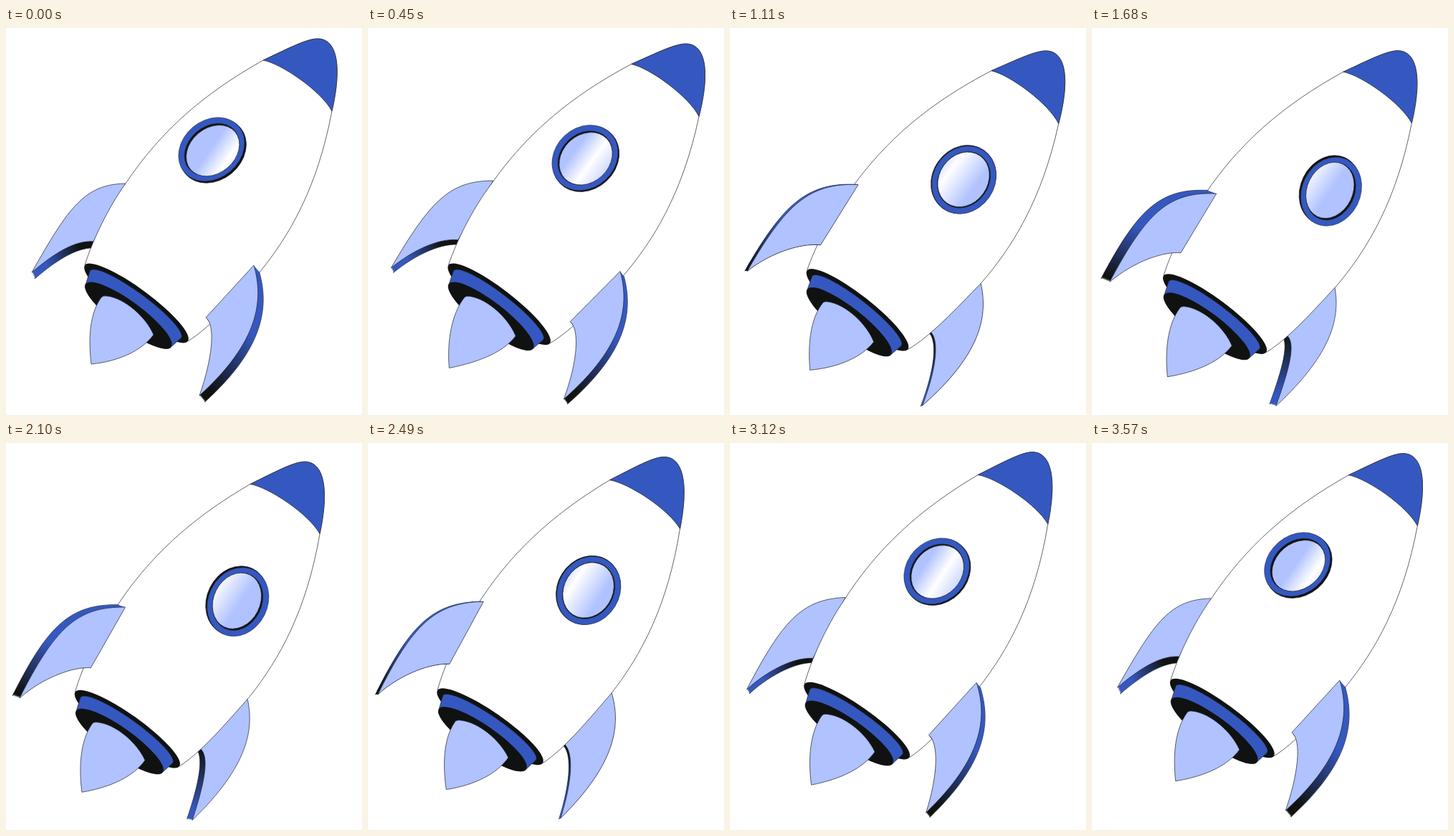
Write an HTML page with a canvas that moves like this. It is 497 by 540 pixels and loops after 3600 ms.

```html
<!DOCTYPE html>
<html lang="en">
<head>
<meta charset="utf-8">
<title>Rocket</title>
<style>
html, body { margin: 0; width: 100%; height: 100%; overflow: hidden; background: #fff; }
canvas { display: block; }
</style>
</head>
<body>
<canvas id="stage" width="497" height="540"></canvas>
<script>
const ctx = document.getElementById('stage').getContext('2d');
const LOOP = 3600, STEP = 30, TAU = Math.PI * 2;
const BLUE = '#3558c0', LIGHT = '#b0c2ff', DARK = '#101211', LINE = '#22252c';
const PIVOT = [182, 384], TILT = 0.6353;

const hull = new Path2D('M110 331C120 298 143 250 167 217C215 145 275 92 359 45' +
  'C395 28 420 15 435 15C463 15 469 55 455 116C435 222 396 290 353 342' +
  'C320 378 285 418 254 437Z');
const cone = new Path2D('M359 45C395 28 420 15 435 15C463 15 469 55 455 116C440 88 385 50 359 45Z');

function paint(path, fill, width = 0.7) {
  ctx.fillStyle = fill;
  ctx.fill(path);
  if (width) {
    ctx.strokeStyle = LINE;
    ctx.lineWidth = width;
    ctx.stroke(path);
  }
}

function oval(x, y, a, b, angle) {
  const path = new Path2D();
  path.ellipse(x, y, a, b, angle, 0, TAU);
  return path;
}

function gradient(from, to, stops) {
  const g = ctx.createLinearGradient(...from, ...to);
  stops.forEach(([at, color]) => g.addColorStop(at, color));
  return g;
}

// Extruded fin: the face outline swept along a depth vector.
function fin(face, depth, from, to, stops) {
  const fill = gradient(from, to, stops);
  for (let i = 12; i > 0; i--) {
    ctx.save();
    ctx.translate(depth[0] * i / 12, depth[1] * i / 12);
    paint(face, fill, i === 12 ? 0.7 : 0);
    ctx.restore();
  }
  paint(face, LIGHT);
}

// Outline root > tip > second root; the outer controls also follow the bend.
function finPath(root, c1, c2, tip, c3, c4, end, [r, t, e], bend) {
  const at = (p, m) => (p[0] + m[0]) + ' ' + (p[1] + m[1]) + ' ';
  const mid = [(r[0] + t[0]) / 2 + bend[0], (r[1] + t[1]) / 2 + bend[1]];
  const low = [t[0] + bend[0], t[1] + bend[1]];
  return new Path2D('M' + at(root, r) + 'C' + at(c1, mid) + at(c2, low) + at(tip, t) +
    'C' + at(c3, t) + at(c4, e) + at(end, e) + 'Z');
}

function leftFin(p) {
  const k = p * (1 - p);
  const moves = [
    [16.5 * p, -34 * k],
    [-42 * k, -28 * k],
    [12.5 * Math.pow(p, 1.8), 1.5 * p - 18 * k]
  ];
  const face = finPath([167, 217], [110, 218], [88, 249], [36, 341],
    [70, 312], [98, 296], [122, 298], moves, [-2 * p, -4 * p]);
  const front = p < 0.58;
  const stops = front
    ? [[0, BLUE], [0.3, BLUE], [0.85, DARK], [1, DARK]]
    : [[0, DARK], [0.08, DARK], [0.6, BLUE], [1, BLUE]];
  fin(face, [4 - 17 * p * p, 9 - 14 * p], [32, 345], front ? [115, 300] : [130, 225], stops);
}

function rightFin(p) {
  const k = p * (1 - p);
  const moves = [
    [2 * p + 24 * k, 20 * p - 8 * p * p],
    [38 * k - 3 * p, 12 * k - 1.5 * p],
    [3 * p + 14 * k, 13 * p - 4 * p * p]
  ];
  const face = finPath([346, 331], [360, 380], [353, 438], [270, 513],
    [288, 462], [293, 415], [279, 404], moves, [-3 * p, 0]);
  const stops = p < 0.5
    ? [[0, BLUE], [0.4, BLUE], [0.9, DARK], [1, DARK]]
    : [[0, DARK], [0.45, DARK], [0.9, BLUE], [1, BLUE]];
  fin(face, [7.5 - 11 * p - 6 * p * p, 9 - 12 * p], [345, 345], [276, 518], stops);
}

function nozzle() {
  paint(oval(182, 384, 89.3, 20, TILT), DARK, 0);
  const ring = new Path2D();
  ring.ellipse(181, 385.5, 79, 16, TILT, Math.PI, TAU);
  ring.ellipse(171, 401, 74, 19, TILT, 0, Math.PI);
  ring.closePath();
  paint(ring, BLUE);
  paint(oval(171, 401, 74, 19, TILT), DARK, 0);
}

function flame(t) {
  const wave = n => 2 - 2 * Math.cos(TAU * n * t / LOOP);
  const len = wave(36) + wave(20);
  const x = 119 - 0.6 * len, y = 469 + 0.7 * len;
  paint(new Path2D(`M133 376Q135 373 141 374C166 377 196 404 206 428` +
    `C190 450 158 465 ${x} ${y}C${x - 4} 436 116 399 133 376Z`), LIGHT);
}

function porthole(p) {
  const q = (2 * p - 1) ** 2;
  const a = 49.7 + 0.4 * q, b = 43.5 - 2.6 * q;
  const angle = -(40 + 25 * p) * Math.PI / 180;
  const x = 287.9 + 56 * p, y = 170.3 + 42 * p;
  const dx = 1.6 * (1 - 2 * p), dy = 1.7 * (1 - 2 * p);
  paint(oval(x + dx * 0.6, y + dy * 0.6, a, b, angle), DARK);
  paint(oval(x - dx * 0.6, y - dy * 0.6, a - 0.4, b - 0.4, angle), BLUE, 0.5);
  paint(oval(x - dx * 0.4, y - dy * 0.4, a - 8.5, b - 8.5, angle), DARK);

  const gx = x + dx * 0.5, gy = y + dy * 0.5;
  const shine = 24 - 66 * Math.pow(p, 0.85);
  const at = d => [gx + 0.82 * d, gy + 0.57 * d];
  const glass = gradient(at(shine - 28), at(shine + 42), [[0, LIGHT], [0.4, '#fff'], [1, LIGHT]]);
  paint(oval(gx, gy, a - 9.4, b - 9.4, angle), glass);
}

function draw(t) {
  const turn = TAU * t / LOOP;
  const s = Math.sin(turn), h = (1 - Math.cos(turn)) / 2;
  const ramp = 1 - Math.abs(1 - 2 * t / LOOP);
  const roll = 0.7 * h + 0.3 * ramp;

  ctx.clearRect(0, 0, 497, 540);
  ctx.save();
  ctx.translate(PIVOT[0] - 11.4 * h + 4 * s, PIVOT[1] + 15.5 * h - 1.3 * s);
  ctx.rotate(0.0315 * s);
  ctx.translate(-PIVOT[0], -PIVOT[1]);

  const flipped = roll > 0.45;
  (flipped ? rightFin : leftFin)(roll);
  paint(hull, '#fff');
  paint(cone, BLUE);
  nozzle();
  flame(t);
  porthole(roll);
  (flipped ? leftFin : rightFin)(roll);
  ctx.restore();
}

const start = performance.now();
function tick() {
  const t = (performance.now() - start) % LOOP;
  draw(Math.floor(t / STEP) * STEP);
  requestAnimationFrame(tick);
}
tick();
</script>
</body>
</html>
```
